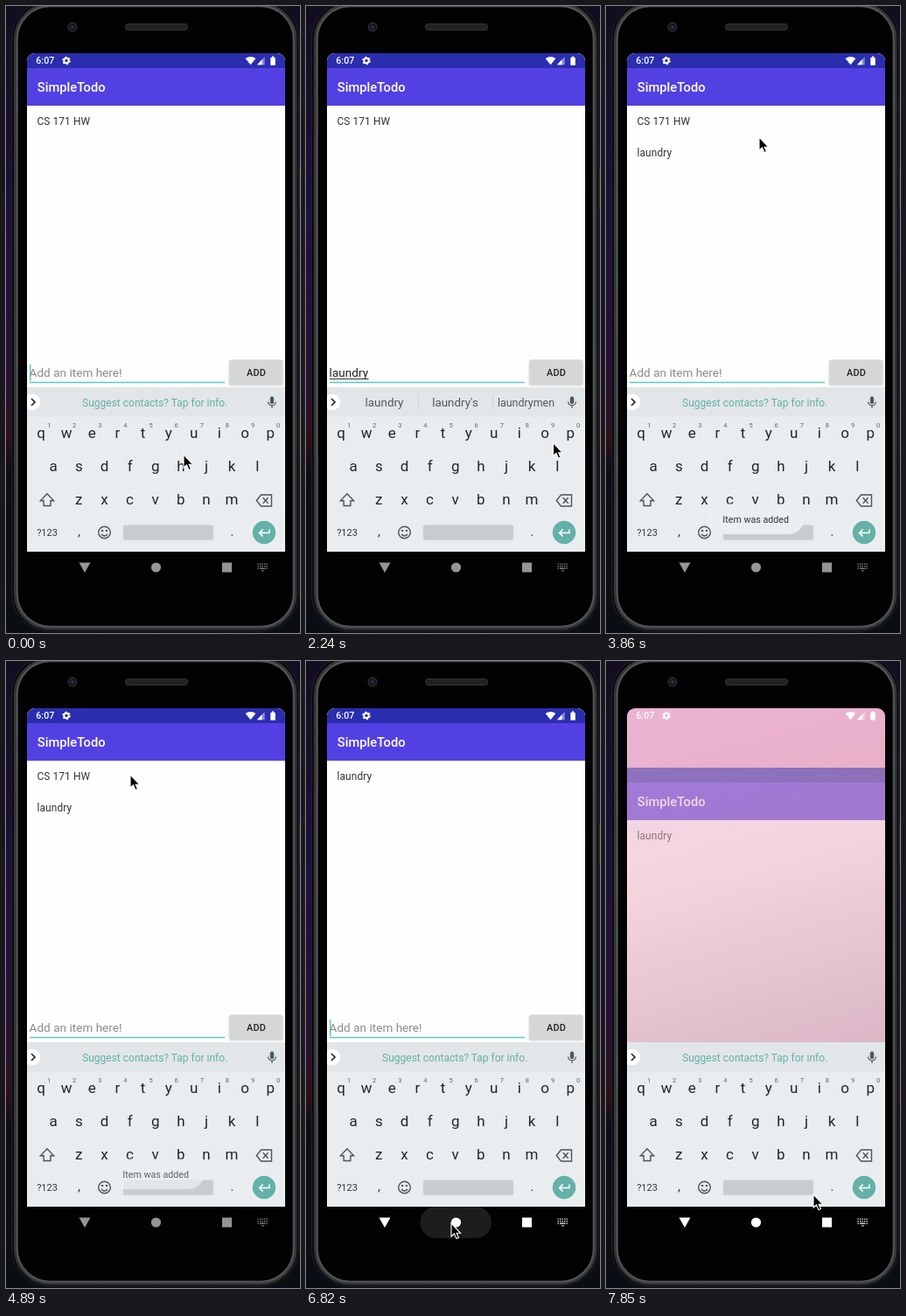
Write an HTML page that moves like this. It is 336 px wide and 717 px high and loops after 8 s.

```html
<!DOCTYPE html>
<html lang="en">
<head>
<meta charset="utf-8">
<title>Todo app on a phone</title>
<style>
html, body { margin: 0; width: 100%; height: 100%; overflow: hidden; background: #0c0b14 }
svg { display: block; width: 100vw; height: 100vh }
text { font-family: Roboto, sans-serif; white-space: pre }
.item { font-size: 11.9px; letter-spacing: .1px; fill: #333 }
.field { font-size: 13.5px; letter-spacing: .04px }
.mid { text-anchor: middle }
.key { font-size: 17px; fill: #20272b }
.line { fill: none; stroke: #4d565b; stroke-width: 1.4 }
</style>
</head>
<body>
<svg viewBox="0 0 336 717" preserveAspectRatio="none">
  <defs>
    <clipPath id="screen"><path d="M24 624V63a9 9 0 0 1 9-9H310a9 9 0 0 1 9 9V624Z"/></clipPath>
    <linearGradient id="desk" x2="0" y2="1">
      <stop offset="0" stop-color="#130d20"/><stop offset=".35" stop-color="#1f0f40"/>
      <stop offset=".6" stop-color="#2a0f34"/><stop offset=".69" stop-color="#300e1b"/>
      <stop offset=".74" stop-color="#0e0d18"/><stop offset="1" stop-color="#0b0d14"/>
    </linearGradient>
    <linearGradient id="wall" gradientUnits="userSpaceOnUse" x1="110" y1="54" x2="220" y2="450">
      <stop offset="0" stop-color="#eab4d1"/><stop offset=".2" stop-color="#e9b0cb"/>
      <stop offset=".45" stop-color="#eaaebf"/><stop offset="1" stop-color="#be7896"/>
    </linearGradient>
    <filter id="soft" x="-20%" y="-30%" width="140%" height="160%"><feGaussianBlur stdDeviation="1"/></filter>
  </defs>

  <!-- phone body -->
  <rect width="336" height="717" fill="url(#desk)"/>
  <rect x="332" y="185" width="4" height="48" rx="1.5" fill="#2c2c30"/>
  <rect x="6.5" y="-6" width="328" height="721" rx="43" fill="#0b0b0c" stroke="#222325"/>
  <rect x="11.5" y="-1" width="318.5" height="712" rx="39" fill="#020202" stroke="#333537" stroke-width="5"/>
  <rect x="12.5" y="0" width="316.5" height="710" rx="38" fill="none" stroke="#55585a" stroke-width="1.6"/>
  <circle cx="76" cy="24" r="5" fill="#15181c" stroke="#35383b"/>
  <circle cx="76" cy="24" r="2" fill="#24323f"/>
  <rect x="136.5" y="20.5" width="71" height="7" rx="3" fill="#222" stroke="#343434"/>

  <g clip-path="url(#screen)">
    <rect x="24" y="54" width="295" height="570" fill="url(#wall)"/>
    <g id="app">
      <rect x="24" y="54" width="295" height="570" fill="#fefefe"/>
      <rect x="24" y="54" width="295" height="18" fill="#2a2dae"/>
      <rect x="24" y="71" width="295" height="43" fill="#5340e2"/>
      <text x="35.8" y="98.3" font-size="14.7" font-weight="500" fill="#fff">SimpleTodo</text>
      <text class="item" id="row1" x="35.5" y="136.2"></text>
      <text class="item" id="row2" x="35.5" y="172.2"></text>
      <text class="field" id="input" x="26.6" y="424.4"></text>
      <path id="compose" stroke="#333"/>
      <rect id="caret" y="410" width="1.4" height="19" fill="#58c4b9"/>
      <path d="M27 430.5H250" stroke="#5cc9be" stroke-width="1.4"/>
      <rect id="shade" x="255" y="405.5" width="61.5" height="28.5" rx="2" fill="#000" filter="url(#soft)"/>
      <rect id="add" x="255.5" y="404.5" width="60.5" height="28.5" rx="2"/>
      <text x="275" y="422.8" font-size="10.9" font-weight="500" letter-spacing=".2" fill="#222">ADD</text>
    </g>

    <!-- status icons -->
    <g fill="#fff">
      <text x="34.3" y="66.4" font-size="10.6" font-weight="500">6:07</text>
      <circle cx="69" cy="62.5" r="2.7" fill="none" stroke="#fff" stroke-width="2"/>
      <circle cx="69" cy="62.5" r="4.1" fill="none" stroke="#fff" stroke-width="1.4" stroke-dasharray="2.15 2.15"/>
      <path d="M273.6 60Q279.5 55.8 285.4 60L279.5 67.3Z"/>
      <path d="M287 67.3L295.6 58V67.3Z" opacity=".45"/>
      <path d="M287 67.3L292.5 61.3V67.3Z"/>
      <path d="M302.3 59H303.8V57.5H306.2V59H307.8V67.8H302.3Z"/>
    </g>

    <!-- keyboard -->
    <rect x="24" y="436" width="295" height="188" fill="#e9edf0"/>
    <rect x="24" y="436" width="295" height="33.5" fill="#e2e6e8"/>
    <circle cx="30" cy="453" r="9.3" fill="#fff"/>
    <path class="line" d="M29 449l4 4-4 4" style="stroke:#222;stroke-width:1.6"/>
    <g id="strip"></g>
    <rect x="301.8" y="446.5" width="4.4" height="8.6" rx="2.2" fill="#50595e"/>
    <path class="line" d="M299.6 452.5a4.4 4.4 0 0 0 8.8 0M304 457v3" style="stroke-width:1.2"/>
    <g id="keys"></g>
    <path class="line" d="M47 557.8l-7.6 8h3.7v5.7h7.8v-5.7h3.7Z"/>
    <path class="line" d="M286.3 565.5l5.2-6.5h12v13h-12ZM293.7 562.3l6 6.4m0-6.4l-6 6.4"/>
    <circle class="line" cx="112.5" cy="602" r="6.8"/>
    <path class="line" d="M109 604q3.5 4 7 0"/>
    <path d="M109 599h2.2v2H109ZM113.8 599h2.2v2h-2.2Z" fill="#4d565b"/>
    <rect x="134" y="593.5" width="103" height="17.3" rx="2" fill="#c8ccce"/>
    <circle cx="295" cy="602" r="13.2" fill="#63b1a7"/>
    <path class="line" d="M301 598.5v4H290m3.6-4l-4 4 4 4" style="stroke:#fff;stroke-width:1.6"/>

    <g id="toast">
      <rect id="pill" y="569.5" height="34.5" rx="17.2" fill="#eceff1"/>
      <text id="note" class="mid" x="171.2" y="591.2" font-size="10.7" fill="#333"></text>
    </g>
  </g>

  <!-- navigation bar -->
  <rect id="ripple" x="130.5" y="624" width="81.5" height="36" rx="18" fill="#1d1d1d"/>
  <g id="nav">
    <path d="M83.5 636.5H96.5L90 648Z"/>
    <circle cx="171.5" cy="642" r="5.6"/>
    <rect x="247" y="636.5" width="11" height="11"/>
    <g opacity=".8">
      <path d="M287.5 638.3H299M287.5 640.8H299" stroke-width="1.4" stroke-dasharray="1.4 1.1"/>
      <path d="M287.5 643.3H299" stroke-width="1.4" stroke-dasharray="1.4 1.1 6.4 1.1"/>
      <path d="M291.5 645.3h4l-2 1.8Z"/>
    </g>
  </g>
  <path id="mouse" d="M0 0V15L3.5 12L6 17.6L8.5 16.5L6.1 11.2H10.6Z" fill="#000" stroke="#fff" stroke-width="1.1"/>
</svg>
<script>
const $ = id => document.getElementById(id);
const set = (id, attrs) => { for (const k in attrs) $(id).setAttribute(k, attrs[k]); };
const label = (x, y, s, size, fill) =>
  `<text class="mid" x="${x}" y="${y}" font-size="${size}" fill="${fill}">${s}</text>`;

const LOOP = 8000, STEP = 148.15, WORD = 'laundry';

let keys = '';
[['qwertyuiop', 40, 494.3], ['asdfghjkl', 54.2, 531.8], ['zxcvbnm', 83.3, 570]].forEach(([row, x0, y], r) =>
  [...row].forEach((c, i) => {
    const x = x0 + i * 29.13;
    keys += `<text class="key mid" x="${x}" y="${y}">${c}</text>`;
    if (!r) keys += label(x + 9, 482, (i + 1) % 10, 7.5, '#5d666b');
  }));
keys += label(47, 606, '?123', 11, '#30383c') + label(83.5, 606, ',', 15, '#30383c') + label(258.5, 606, '.', 15, '#30383c');
$('keys').innerHTML = keys;

// pointer stops: [step, x, y], linear in between
const path = [[0, 203, 513], [2, 248, 524], [4, 279, 521], [14, 279, 521], [16, 286, 478], [18, 300, 392],
  [20, 297, 409], [21, 297, 413], [23, 297, 413], [24, 286, 378], [26, 175, 150], [27, 146, 110], [28, 142, 130],
  [35, 142, 130], [38, 162, 683], [40, 166, 643], [47, 166, 643], [48, 190, 622], [50, 235, 600],
  [51, 250, 592], [52, 254, 591], [53, 237, 610]];
function pointer(n) {
  const i = Math.max(1, path.findIndex(p => p[0] >= n));
  const [a, x, y] = path[i - 1], [b, u, v] = path[i], k = (n - a) / (b - a);
  return `translate(${x + (u - x) * k} ${y + (v - y) * k})`;
}

const guesses = [['la', 'last', 'late'], ['lau', 'laugh', 'laundry'], ['laun', 'launch', 'laundry'],
  ['laund', 'laundry', 'launder'], ['laundr', 'laundry', 'laundries'], ['laundry', "laundry's", 'laundrymen']];
function strip(n) {
  if (n < 8 || n > 22) return label(170.2, 457.6, 'Suggest contacts? Tap for info.', 12, '#62b0a5');
  return guesses[Math.min(n - 8, 5)].map((s, i) =>
    label(89.5 + i * 81, 458, s, s.length > 9 ? 12.45 : 13.4, '#50595e')).join('') +
    '<path d="M128.5 445V462M213.5 445V462" stroke="#cfd4d6"/>';
}

function draw(n) {
  const typed = n > 6 && n < 22 ? WORD.slice(0, n - 6) : '';
  const added = n >= 23, removed = n >= 35;
  $('row1').textContent = removed ? WORD : 'CS 171 HW';
  $('row2').textContent = added && !removed ? WORD : '';

  $('input').textContent = typed || 'Add an item here!';
  set('input', { fill: typed ? '#222' : '#8b8b8b' });
  const end = 27 + (typed ? $('input').getComputedTextLength() : 0);
  set('compose', { d: typed ? `M27 426.5H${end}` : '' });
  const blink = Math.abs(Math.floor((n - 31) / 3) % 2) === 1;
  set('caret', { x: end, opacity: blink || n > 6 && n < 15 ? 1 : 0 });

  const pressed = n === 21 || n === 22;
  set('shade', { opacity: pressed ? .4 : .2 });
  set('add', { fill: pressed ? '#cfd1d1' : '#d5d7d6' });
  $('strip').innerHTML = strip(n);

  const start = removed ? 35 : 23, age = n - start;
  const shown = !added || age > 10 ? 0 : age === 0 ? .5 : age === 10 ? .75 : 1;
  $('note').textContent = removed ? 'Item was removed' : 'Item was added';
  const half = removed ? 62 : 55;
  set('pill', { x: 171 - half, width: 2 * half });
  set('toast', { opacity: shown });

  const lit = n >= 44 ? '#fff' : '#959595';
  set('nav', { fill: lit, stroke: 'none' });
  document.querySelectorAll('#nav [stroke-dasharray]').forEach(p => p.setAttribute('stroke', lit));
  set('ripple', { opacity: n >= 45 && n <= 47 ? 1 : 0 });

  // app leaves for the home screen
  const drop = n === 52 ? 12.5 : n === 53 ? 68 : 0;
  set('app', { transform: `translate(0 ${drop})`, opacity: n === 53 ? .48 : 1 });
  set('mouse', { transform: pointer(n) });
}

let last = -1;
function tick() {
  const n = Math.min(53, Math.floor((performance.now() % LOOP + 4) / STEP));
  if (n !== last) draw(last = n);
  requestAnimationFrame(tick);
}
tick();
</script>
</body>
</html>
```
